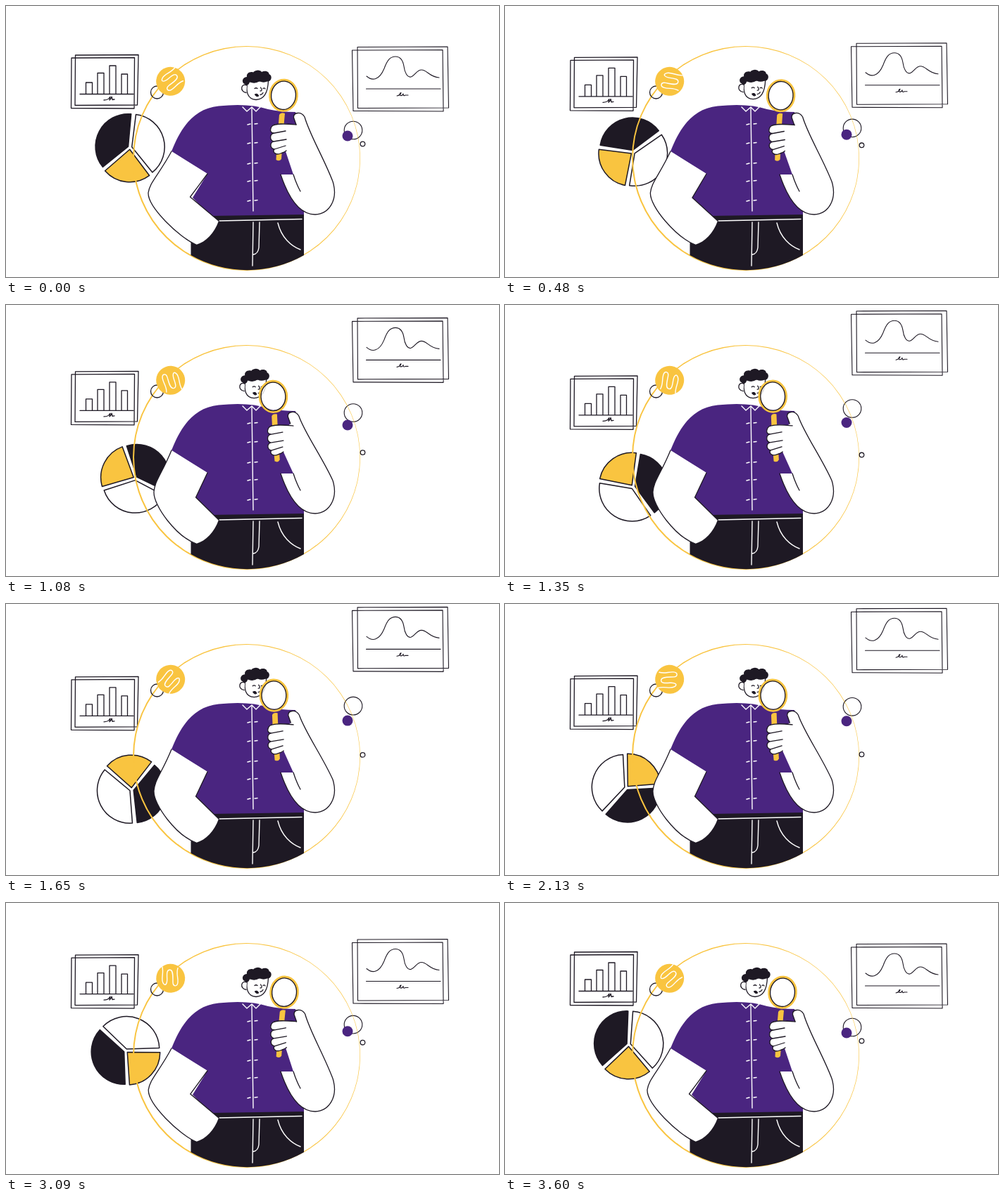
An HTML page that plays this animation: 700 by 386 pixels, repeating every 3.63 s.

```html
<!DOCTYPE html>
<html lang="en">
<head>
<meta charset="utf-8">
<title>Data analyst</title>
<style>
  html, body { margin: 0; width: 100%; height: 100%; overflow: hidden; background: #fff; }
  svg { display: block; width: 700px; height: 386px; }
  .ink { fill: none; stroke: #1e1924; stroke-width: 1.3; stroke-linecap: round; stroke-linejoin: round; }
  .fine { stroke-width: 1.1; }
  .paper { fill: #fff; }
  .chalk { fill: none; stroke: #fff; stroke-width: 1.4; stroke-linecap: round; stroke-linejoin: round; }
  .dark { fill: #1e1924; }
  .gold { fill: #f9c440; }
  .purple { fill: #4a2580; }
</style>
</head>
<body>
<svg viewBox="0 0 700 386">
  <g id="bars" class="ink">
    <path d="M98.500 70 188 69.500 186.500 141 98 141.500ZM93 74 182.500 73.500 182 146 92.500 145.500Z"/>
    <path d="M105 125.500H181M113.500 125V109H122.500V125M130 125V95.500H139V125M147 125V85H156V125M164 125V97H172.500V125"/>
    <path d="M139 134Q145 134 147 130.500T147 134Q150 131 150 129.500T151 133.500L154 133"/>
  </g>

  <g id="graph" class="ink fine">
    <path d="M499 58.500 627 58 628.500 145 499.500 145.500ZM491.500 63 620 62.500 621 150 493 149.500Z"/>
    <path d="M512 100C520 107 530 106 537 89C541 78 545 72 553 72C562 72 564 80 565 86C566 95 570 102 575 101C581 99 583 91 590 91C598 91 601 101 615 102M511.500 118H617"/>
    <path d="M555 128Q560 127 561 123.500Q558 124 560 127.500Q563 128 564 125Q564 129 567 127L571 127"/>
  </g>

  <g id="pie" stroke="#1e1924" stroke-width="1.500" stroke-linejoin="round"></g>

  <circle id="ring" class="ink fine" cx="493" cy="177" r="12.800"/>
  <!-- Hoop that is thinner on the right -->
  <path class="gold" fill-rule="evenodd" d="M180 217a161.500 160 0 0 1 323 0a161.500 160 0 0 1 -323 0M182 216.800a160.200 158.700 0 0 1 320.400 0a160.200 158.700 0 0 1 -320.400 0"/>
  <circle id="dot" class="purple" cx="485" cy="185" r="7.500"/>
  <circle id="bead" class="ink" cx="506.500" cy="196.500" r="3.300"/>

  <circle class="ink" cx="214.500" cy="123" r="9"/>
  <g id="ball">
    <circle class="gold" r="20.500"/>
    <path class="chalk" d="M17 -11C8 -9 0 -14 -6 -11S-7 -5 0 -5S13 -5 12 0S0 3 -6 3S-13 9 -6 10S6 8 14 11"/>
  </g>

  <path class="dark" d="M285 296H423V355A161 159.300 0 0 1 262.500 355V332Z"/>
  <path class="purple" d="M235 207C248 174 266 146 302 142.500Q345 138 372 147Q390 151 411 151L423 200V297L290 299 265 273 286 239Z"/>
  <path class="chalk" d="M303 306 420 303.500M351 308 350 370M360 308 359 344Q358 353 351 354M386 309C391 330 405 342 418 347"/>
  <path class="chalk" d="M336 144 342 150 349 144 355 150 361 144M349 146 351 292"/>
  <path id="buttons" class="chalk"/>

  <path id="sleeve" class="paper"/>
  <path id="elbow" class="ink"/>

  <g id="head">
    <path class="ink paper" d="M343 108C340 122 343 133 355 133.500C367 133 372 122 372.500 106Z"/>
    <path class="ink paper" d="M342 113C334 109 331 122 341 123.500"/>
    <path class="dark" d="M337 110C334 105 338 101 342 101C341 96 346 93 351 94.500C355 90.500 361 91 363 94C368 91 374 94 373.500 97C379 99 377 108 371 107.500Q365 110 360 107Q353 112 346 108Q345 113 341 112.500Z"/>
    <path class="ink" d="M353 117.500Q355 116 357 117.500M365 117.500Q367 116 368 118M361.500 116Q365 121 361 121M361 126.500Q364 126 365 123.500"/>
    <path class="ink dark" d="M353.500 126Q357 124 358.500 128Q356 130 353.500 126Z"/>
  </g>

  <path id="arm" class="paper"/>
  <path id="armLine" class="ink"/>
  <g id="glass">
    <path class="gold" d="M388 155Q390 151 396 153L394 175 391 218Q388 222 383.500 219L385 190Z"/>
    <g transform="rotate(5 394 127.300)">
      <ellipse cx="394" cy="127.300" rx="19" ry="21.800" fill="#fff" fill-opacity=".8" stroke="#f9c440" stroke-width="3.500"/>
      <ellipse class="ink" cx="394" cy="127.300" rx="17.400" ry="20.200"/>
    </g>
  </g>
  <path id="hand" class="ink paper" d="M412 169C400 168 380 166 377 172C374 178 376 181 381 181C374 182 374 191 380 193C374 195 375 203 381 204C378 208 383 213 390 210Q396 208 398 206M381 181 397 178M380 193 398 190M381 204 397 199"/>
</svg>

<script>
const LOOP = 3630, PEAK = 1790;
const $ = id => document.getElementById(id);
const set = (id, value, attr = "transform") => $(id).setAttribute(attr, value);
const shiftY = (id, y) => set(id, `translate(0 ${y})`);
const polar = (r, deg) => [r * Math.cos(deg * Math.PI / 180), r * Math.sin(deg * Math.PI / 180)];

// Sectors sit slightly apart around the pie's own centre.
const sector = (from, to, fill) => {
  const [ox, oy] = polar(2.8, (from + to) / 2);
  const [ax, ay] = polar(46.5, from + 1), [bx, by] = polar(46.5, to - 1);
  return `<path fill="${fill}" d="M${ox} ${oy}l${ax} ${ay}A46.5 46.5 0 0 1 ${ox + bx} ${oy + by}Z"/>`;
};
$("pie").innerHTML = sector(52, 140, "#f9c440") + sector(140, 276, "#1e1924") + sector(276, 412, "#fff");
set("buttons", [168, 195, 224, 249, 277].map(y => `M343 ${y + 1}l4 -1M353 ${y}l4 -.5`).join(""), "d");

// Inverts a cubic-bezier(.6, 0, .4, 1) timing curve.
const ease = x => {
  let lo = 0, hi = 1;
  for (let i = 0; i < 20; i++) {
    const s = (lo + hi) / 2, q = 1 - s;
    if (1.8 * s * q * q + 1.2 * s * s * q + s ** 3 < x) lo = s; else hi = s;
  }
  return lo * lo * (3 - 2 * lo);
};

// Smooth interpolation through [time, value] keys.
const track = (t, keys) => {
  const i = keys.findIndex(k => k[0] > t);
  const [t0, a] = keys[i - 1], [t1, b] = keys[i];
  const u = (t - t0) / (t1 - t0);
  return a + (b - a) * u * u * (3 - 2 * u);
};
const HEAD = [[0, 0], [450, 1], [2130, 1], [2600, 0], [LOOP, 0]];
const GLASS = [[0, 0], [330, .05], [1020, 1.03], [1500, .96], [2130, .96], [2620, -.14], [LOOP, 0]];
const ELBOW = [[0, 0], [900, 1], [2130, 1], [3200, 0], [LOOP, 0]];

function draw(t) {
  const bob = ease(t < PEAK ? t / PEAK : (LOOP - t) / (LOOP - PEAK));
  const turn = t / LOOP * 360 + 5 * bob;

  shiftY("bars", 34 * bob);
  shiftY("graph", -54 * bob);
  shiftY("ring", -32 * bob);
  shiftY("dot", -19 * bob);
  shiftY("bead", 18.5 * bob);
  set("pie", `translate(176.500 ${209 + 48.5 * bob}) rotate(${turn}) translate(-.5 -7.5)`);
  set("ball", `translate(233.700 107.300) rotate(${turn - 40})`);

  const h = track(t, HEAD);
  set("head", `translate(${-2.8 * h} ${-.8 * h})`);

  const e = track(t, ELBOW);
  const outer = `C${218 + 4 * e} 239 ${204 + 7 * e} 251 ${202 + 8 * e} 266C${201 + 8 * e} 286 ${246 - 4 * e} 330 270 340`;
  const inner = `L${261.5 + 8 * e} ${272 + 2 * e} 302 306`;
  set("sleeve", `M235 207${outer}C284 336 296 323 302 306L${261.5 + 8 * e} ${272 + 2 * e} 286 239Z`, "d");
  set("elbow", `M235 207${outer}M286 239${inner}`, "d");

  const g = track(t, GLASS);
  const dx = -8 * g;
  const top = `M${412 + dx} 169L${408.5 + dx} 159C${408 + dx} 151 ${419 + dx} 150 ${424 + dx} 158`;
  const under = `C${431 + dx * .8} 183 ${451 + dx * .3} 216 464 250C472 276 459 296 439 297C414 297 399 267 390 240`;
  set("arm", `${top}${under}H408L${397 + dx / 2} 207 ${386 + dx / 2} 190Z`, "d");
  set("armLine", `${top}${under}M408 240Q412 253 418 264`, "d");
  set("glass", `translate(${-2 * g} ${3 * g}) rotate(${-7.6 * g} 387.500 219)`);
  set("hand", `translate(${-4 * g} ${3 * g})`);
}

function frame() {
  draw(performance.now() % LOOP);
  requestAnimationFrame(frame);
}
frame();
</script>
</body>
</html>
```
